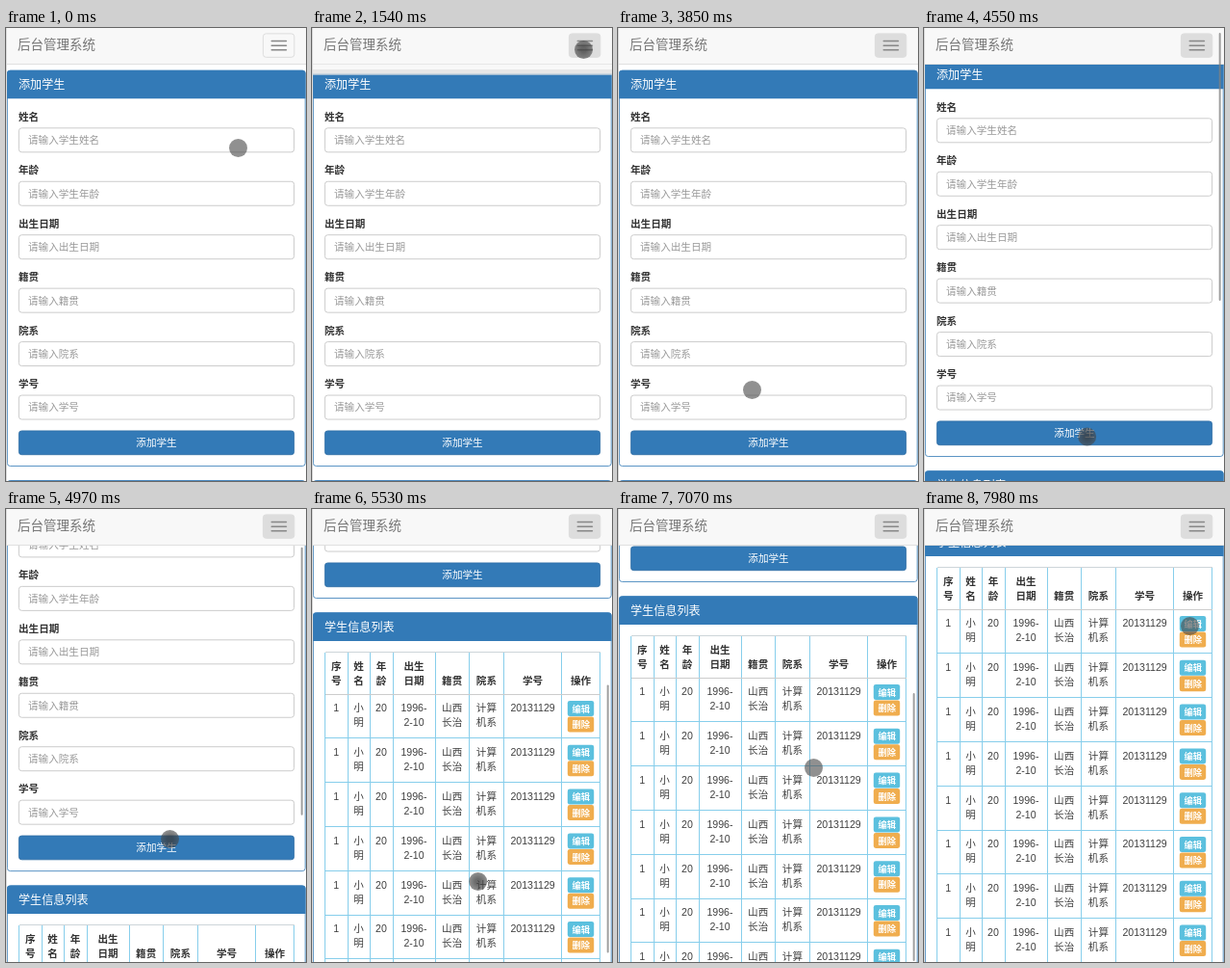
Write an HTML page that moves like this. It is 312x470 px and loops after 8000 ms.

```html
<!DOCTYPE html>
<html lang="zh-CN">
<head>
<meta charset="utf-8">
<title>后台管理系统</title>
<style>
html, body { margin: 0; width: 100%; height: 100%; overflow: hidden; background: #fff; }
svg { display: block; width: 312px; height: 470px; }
text { font-family: "Liberation Sans", "Noto Sans CJK SC", "Noto Sans CJK", sans-serif; white-space: pre; }
line { shape-rendering: crispEdges; }
</style>
</head>
<body>
<svg id="stage" viewBox="0 0 312 470">
  <defs>
    <clipPath id="menuClip"><rect id="menuMask" x="0" y="37" width="312" height="0"/></clipPath>
    <radialGradient id="pressed">
      <stop offset="0.3" stop-color="#3c3c3c" stop-opacity="0.76"/>
      <stop offset="1" stop-color="#464646" stop-opacity="0.6"/>
    </radialGradient>
  </defs>
  <g id="page"></g>
  <g id="nav"></g>
  <rect id="bar" x="306.7" width="2" height="278" rx="1" fill="#808080" fill-opacity="0.75"/>
  <rect width="1" height="470" fill="#ddd"/>
  <circle id="cursor" r="9.5" transform="translate(0.5 0.5)"/>
</svg>
<script>
const NS = 'http://www.w3.org/2000/svg';
const $ = id => document.getElementById(id);
const BASE = 10.6, BLUE = '#337ab7', SKY = '#87ceeb';

function add(parent, tag, attrs) {
  const el = document.createElementNS(NS, tag);
  for (const k in attrs) el.setAttribute(k, attrs[k]);
  parent.appendChild(el);
  return el;
}
const box = (parent, x, y, width, height, fill, more) =>
  add(parent, 'rect', { x, y, width, height, fill, ...more });
const line = (parent, x1, y1, x2, y2, stroke) =>
  add(parent, 'line', { x1, y1, x2, y2, stroke });

// Text placed by its vertical centre
function label(parent, str, x, cy, fill, { size = BASE, weight = 400, mid } = {}) {
  const el = add(parent, 'text', {
    x, y: cy + size * 0.37, fill, 'font-size': size,
    'font-weight': weight, 'text-anchor': mid ? 'middle' : 'start'
  });
  el.textContent = str;
}

function panel(parent, y, h, title) {
  box(parent, 1.4, y, 309.8, h, '#fff', { rx: 3, stroke: BLUE, 'stroke-width': 0.8 });
  add(parent, 'path', { d: `M1 ${y + 29.3}V${y + 3}q0-3 3-3H308.5q3 0 3 3V${y + 29.3}z`, fill: BLUE });
  label(parent, title, 13, y + 15, '#fff', { size: 12.1, weight: 500 });
}

function buildForm(page) {
  panel(page, 44, 410.5, '添加学生');
  const fields = [['姓名', '学生姓名'], ['年龄', '学生年龄'], ['出生日期', '出生日期'],
    ['籍贯', '籍贯'], ['院系', '院系'], ['学号', '学号']];
  fields.forEach(([name, hint], i) => {
    const y = i * 55.45;
    label(page, name, 13, 92 + y, '#333', { weight: 700 });
    box(page, 13.4, 103.8 + y, 286.2, 25, '#fff', { rx: 3, stroke: '#ccc' });
    label(page, '请输入' + hint, 23, 116.3 + y, '#999');
  });
  box(page, 13.4, 417.9, 286.2, 24.8, BLUE, { rx: 3, stroke: '#2e6da4', 'stroke-width': 0.8 });
  label(page, '添加学生', 156.5, 430.3, '#fff', { mid: true, weight: 500 });
}

function buildTable(page) {
  const edges = [13.5, 37, 60, 84, 128, 163.3, 199.5, 259.7, 299.5];
  const heads = ['序 号', '姓 名', '年 龄', '出生 日期', '籍贯', '院系', '学号', '操作'];
  const cells = ['1', '小 明', '20', '1996- 2-10', '山西 长治', '计算 机系', '20131129'];
  const top = 510.5, body = 554, step = 45.8, rows = 10, end = body + rows * step;
  const centre = i => (edges[i] + edges[i + 1]) / 2;

  panel(page, 469.6, end + 12 - 469.6, '学生信息列表');
  heads.forEach((h, i) => {
    const lines = h.split(' ');
    lines.forEach((s, k) => label(page, s, centre(i), 540 - (lines.length - 1 - k) * 15,
      '#333', { weight: 700, mid: true }));
  });
  for (let r = 0; r < rows; r++) {
    const y = body + r * step;
    cells.forEach((c, i) => c.split(' ').forEach((s, k) =>
      label(page, s, centre(i), y + 14.4 + k * 15, '#404040', { mid: true })));
    [['编辑', '#5bc0de'], ['删除', '#f0ad4e']].forEach(([s, fill], k) => {
      const by = y + 7 + k * 16.5;
      box(page, 265.8, by, 27.4, 16, fill, { rx: 2.3 });
      label(page, s, 279.7, by + 8.2, '#fff', { size: 9.3, weight: 700, mid: true });
    });
    line(page, 13.5, y + step, 299.5, y + step, SKY);
  }
  edges.forEach(x => line(page, x, top, x, end, SKY));
  line(page, 13.5, top, 299.5, top, '#cdd5d9');
  line(page, 13.5, body, 299.5, body, '#ccc');
}

function buildNav(nav) {
  box(nav, 0, 0, 312, 37, '#f8f8f8');
  const menu = add(nav, 'g', { 'clip-path': 'url(#menuClip)' });
  box(menu, 0, 37, 312, 103, '#f8f8f8');
  line(menu, 0, 37.5, 312, 37.5, '#e7e7e7');
  box(menu, 0, 43, 312, 30, '#e7e7e7');
  label(menu, '首页', 12.5, 58, '#555');
  label(menu, '欢迎您:nomiv', 12.5, 93, '#777');
  label(menu, '个人中心', 12.5, 123.3, '#777');
  box(nav, 0, 37, 312, 1, '#e0e0e0', { id: 'navEdge' });
  label(nav, '后台管理系统', 12, 17.3, '#777', { size: 13.5 });
  box(nav, 267.4, 5.9, 32.4, 24.4, 'none', { id: 'toggle', rx: 3, stroke: '#ddd' });
  for (let i = 0; i < 3; i++) box(nav, 275.5, 12.8 + i * 4.6, 16.7, 1.5, '#888', { rx: 0.7 });
}

buildForm($('page'));
buildTable($('page'));
buildNav($('nav'));

const LOOP = 8000, TICK = 70;
const OPEN = 1470, CLOSE = 2870;

// start, end, then where the pointer arrives
const moves = [
  [70, 280, 240.5, 121.5], [560, 1260, 282, 22], [1610, 2030, 210, 199],
  [2100, 2660, 290, 21.5], [2940, 3640, 178, 276.5], [3640, 3850, 139, 375],
  [3850, 4480, 169, 437], [4480, 4970, 170, 342], [4970, 5110, 171, 250],
  [5110, 5250, 172, 400], [5460, 5810, 173, 330], [6020, 6370, 200, 240],
  [6440, 6650, 202, 275], [6930, 7070, 203, 268], [7070, 7350, 208, 190],
  [7350, 7770, 276, 121]
];
// start, end, distance, easing power
const drags = [[4480, 4690, 30, 1], [4760, 5250, 310, 2.18], [5460, 5810, 110, 1],
  [6440, 6650, -71, 1], [7070, 7350, 71, 1]];
const clicks = [OPEN, CLOSE, 7840];

const ramp = (t, a, b) => Math.min(1, Math.max(0, (t - a) / (b - a)));
const smooth = u => u * u * (3 - 2 * u);

function pointer(t) {
  let x = 241, y = 124;
  for (const [a, b, tx, ty] of moves) {
    const u = ramp(t, a, b);
    x += (tx - x) * u;
    y += (ty - y) * u;
  }
  return [x, y];
}

function draw(now) {
  const t = Math.floor((now % LOOP) / TICK) * TICK;
  const [x, y] = pointer(t);
  const s = drags.reduce((sum, [a, b, d, p]) => sum + d * ramp(t, a, b) ** p, 0);
  const h = 102 * (smooth(ramp(t, OPEN, OPEN + 350)) - smooth(ramp(t, CLOSE, CLOSE + 350)));
  const fade = ramp(t, 4480, 4550) - ramp(t, 6020, 6370) + ramp(t, 6440, 6510) - ramp(t, 7770, 7980);
  const down = clicks.some(c => t >= c && t < c + 2 * TICK) ||
    drags.some(([a, b]) => t > a && t < b);
  const set = (id, k, v) => $(id).setAttribute(k, v);
  set('page', 'transform', `translate(0 ${-s})`);
  set('menuMask', 'height', h);
  set('navEdge', 'y', 37 + h);
  set('toggle', 'fill', t >= OPEN ? '#ddd' : 'none');
  set('bar', 'y', s * 0.504);
  set('bar', 'opacity', fade);
  set('cursor', 'cx', x);
  set('cursor', 'cy', y);
  set('cursor', 'fill', down ? 'url(#pressed)' : 'rgba(70,70,70,0.6)');
}

const start = performance.now();
function tick() {
  draw(performance.now() - start);
  requestAnimationFrame(tick);
}
tick();
</script>
</body>
</html>
```
